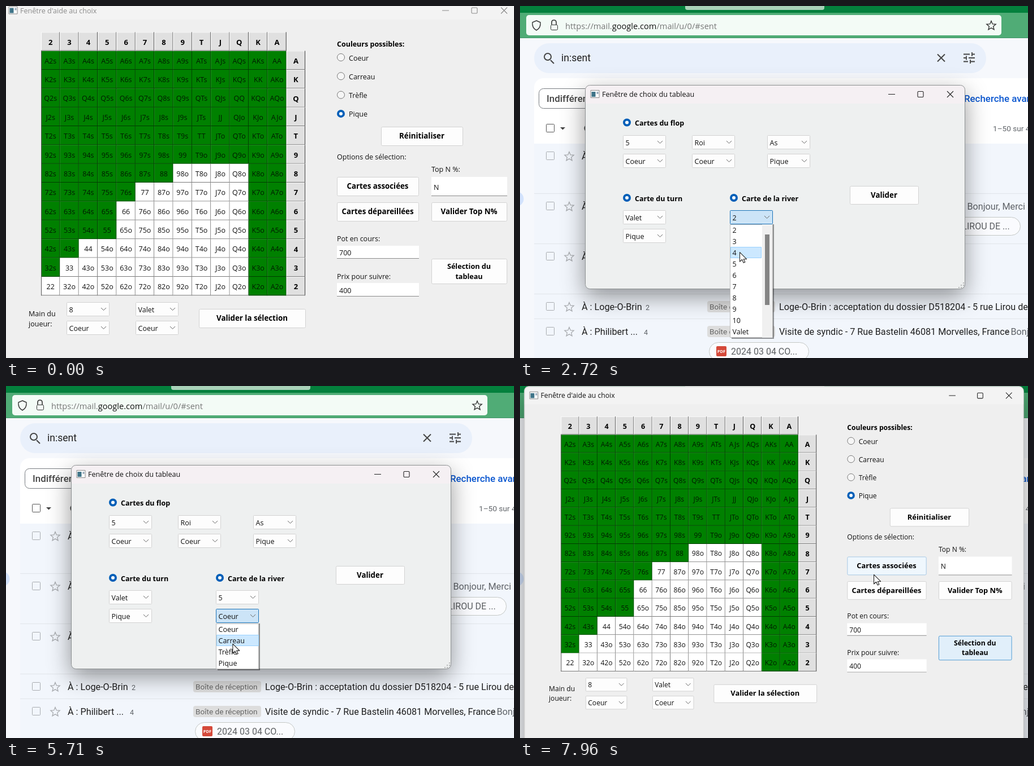
An HTML page with a canvas for the animation above (8000 ms loop, 898 by 624 pixels).

```html
<!DOCTYPE html>
<html lang="fr">
<meta charset="utf-8">
<title>Aide au choix</title>
<style>
html, body { margin: 0; width: 100%; height: 100%; overflow: hidden; }
canvas { display: block; }
</style>
<canvas id="stage" width="898" height="624"></canvas>
<script>
const LOOP = 8000, W = 898, H = 624;
const screen2d = document.getElementById('stage').getContext('2d');
const layer2d = Object.assign(document.createElement('canvas'), { width: W, height: H }).getContext('2d');
let g = screen2d;

const UI = '"Open Sans", "Noto Sans", sans-serif', WEB = 'Roboto, Arial, sans-serif';
const RANKS = '23456789TJQKA';
const clamp = v => Math.max(0, Math.min(1, v));
const span = (t, from, length) => clamp((t - from) / length);
const between = (t, a, b) => t >= a && t < b;

// Drawing helpers; text is centred vertically on y by cap height
function box(x, y, w, h, fill, line, r = 0) {
  g.beginPath();
  const o = line ? .5 : 0;
  g.roundRect(x + o, y + o, w, h, r);
  if (fill) { g.fillStyle = fill; g.fill(); }
  if (line) { g.strokeStyle = line; g.lineWidth = 1; g.stroke(); }
}
function text(s, x, y, { size = 12.5, weight = 400, color = '#111', align = 'left', family = UI } = {}) {
  g.font = `${weight} ${size}px ${family}`;
  g.fillStyle = color;
  g.textAlign = align;
  g.fillText(s, x, y + size * .36);
}
const web = (s, x, y, o) => text(s, x, y, { size: 16.2, family: WEB, color: '#1f1f1f', ...o });
const bold = (s, x, y, o) => text(s, x, y, { weight: 700, color: '#000', ...o });
function path(d, line, width = 1, fill) {
  const p = new Path2D(d);
  if (fill) { g.fillStyle = fill; g.fill(p); }
  if (line) { g.strokeStyle = line; g.lineWidth = width; g.stroke(p); }
}
function circle(x, y, r, fill, line) {
  g.beginPath();
  g.arc(x, y, r, 0, 7);
  g.fillStyle = fill;
  g.fill();
  if (line) { g.strokeStyle = line; g.lineWidth = 1; g.stroke(); }
}
function star(x, y, r, color, width) {
  let d = '';
  for (let i = 0; i < 10; i++) {
    const a = i * Math.PI / 5, q = i % 2 ? r * .45 : r;
    d += (i ? 'L' : 'M') + (x + q * Math.sin(a)) + ' ' + (y - q * Math.cos(a));
  }
  path(d + 'Z', color, width);
}

// Widgets; level: 0 idle, 1 soft, 2 hover, 3 pressed
const FILLS = ['#fdfdfd', '#eff7fd', '#e1effa', '#cce4f7'];
const LINES = ['#d2d2d2', '#a5c8e4', '#4c9ad4', '#1a73b8'];
function button(label, x, y, w, h, level = 0) {
  box(x, y, w, h, FILLS[level], LINES[level], 2);
  const lines = label.split('\n');
  lines.forEach((s, i) => bold(s, x + w / 2, y + h / 2 + (i - (lines.length - 1) / 2) * 18,
    { size: lines.length > 1 ? 12.6 : 13.3, align: 'center' }));
}
function combo(label, x, y, level = 0) {
  box(x, y, 75, 24, FILLS[level], LINES[level], 1);
  text(label, x + 4.5, y + 13);
  path(`M${x + 61} ${y + 10}l4.5 4.5l4.5 -4.5`, '#666');
}
function entry(label, x, y, w, h) {
  box(x, y, w, h, '#fff');
  box(x, y + h - 1, w, 1, '#8a8a8a');
  text(label, x + 4, y + h / 2 + 1);
}
function radio(label, x, y, on, strong) {
  if (on) { circle(x, y, 7, '#005fb8'); circle(x, y, 3, '#fff'); }
  else circle(x, y, 6.5, '#f6f6f6', '#777');
  (strong ? bold : text)(label, x + 14, y + 1);
}
function titleBar(label, x, y, right, color, iconColor) {
  box(x, y - 7, 15, 13, '#fff', '#888');
  box(x + 2, y - 4, 7, 9, '#3f7488');
  box(x + 11, y - 4, 3, 4, '#9ab');
  text(label, x + 20.5, y + .5, { size: 12.6, color });
  path(`M${right - 109} ${y + .5}h12M${right - 5} ${y - 5}l11 11m0 -11l-11 11`, iconColor, 1.1);
  g.beginPath();
  g.roundRect(right - 57, y - 4.5, 10, 10, 1.5);
  g.stroke();
}
function windowFrame(x, y, w, h, title, fill, line) {
  g.save();
  g.shadowColor = 'rgba(0,0,0,.42)';
  g.shadowBlur = 42;
  g.shadowOffsetY = 14;
  box(x, y, w, h, fill, null, 8);
  g.restore();
  g.save();
  g.beginPath();
  g.roundRect(x, y, w, h, 8);
  g.clip();
  box(x, y, w, 33, title);
  g.restore();
  box(x, y, w, h, null, line, 8);
}

function chip(label, x, y, w = 176) {
  box(x, y - 16, w, 32, '#fafbfe', '#c4c7c5', 16);
  box(x + 13, y - 9, 18, 18, '#d5493a', null, 2);
  text('PDF', x + 22, y, { size: 7.5, weight: 700, color: '#fff', align: 'center' });
  web(label, x + 39, y, { color: '#5c5f62', size: 16 });
}
function mailRow(y, to, count, subject, tagged, snippet, snippetX) {
  box(46, y - 8, 14, 14, null, '#a9acb0', 1);
  star(87, y + 1, 8.5, '#a9acb0', 1.3);
  web('À : ' + to, 109, y);
  web(count, count && to.length > 11 ? 219 : 222, y + 1, { size: 12.5, color: '#5f6368' });
  if (tagged) {
    box(331, y - 10, 120, 20, '#dddddd', null, 4);
    web('Boîte de réception', 335, y, { size: 13.6, color: '#666' });
  }
  web(subject, tagged ? 458 : 331, y);
  if (snippet) web(snippet, snippetX, y, { color: '#5f6368' });
}

function mailPage() {
  box(0, 0, W, H, '#f6f8fc');
  box(0, 0, W, 12, '#04803d');
  box(0, 12, W, 45, '#50ac76');
  box(0, 56, W, 1, '#3f9465');
  box(292, -6, 246, 13, '#a8d1b8', null, 4);
  box(11, 16, 840, 36, '#f3fbf6', null, 5);
  path('M29 26l7 3q1 10 -7 14q-8 -4 -7 -14z', '#333', 1.4);
  path('M56 33v-4q0 -4 4 -4t4 4v4', '#333', 1.6);
  box(54, 33, 12, 9, null, '#333', 2);
  star(833, 35, 8.5, '#333', 1.4);
  let x = 80;
  [['https://mail.', '#777'], ['google.com', '#111'], ['/mail/u/0/#sent', '#777']].forEach(([s, color]) => {
    text(s, x, 35.5, { size: 14.6, color });
    x += g.measureText(s).width;
  });

  box(25, 66, 799, 53, '#e9f0fb', null, 27);
  path('M54 96l6 6M55 90a6 6 0 1 0 -12 0a6 6 0 1 0 12 0', '#444', 2);
  web('in:sent', 73, 92, { size: 17.5 });
  path('M738 85.500l13 13m0 -13l-13 13', '#444', 2);
  path('M784 85.500h11M799 85.500h5M799 82v7M784 92h5M793 92h11M789 88.500v7M784 98.500h8M796 98.500h8M796 95v7', '#444', 1.8);

  box(25, 128, 900, 520, '#fff', null, 16);
  [[33, 143, 'Indifférente', 47], [187, 216, 'Contient une pièce jointe', 200],
   [413, 279, "Exclure les mises à jour d'agenda", 427], [701, 65, 'À', 715]].forEach(([l, w, s, tx]) => {
    box(l, 146, w, 35, '#fff', '#777b80', 8);
    web(s, tx, 163.5, { size: 16.9, weight: 500, color: '#444' });
  });
  path('M149 161h10l-5 5zM738 161h10l-5 5z', null, 0, '#444');
  web('Recherche avancée', 785, 163.5, { size: 16.9, weight: 500, color: '#0b57d0' });
  box(46, 209, 14, 14, null, '#555', 1);
  path('M71 215h9l-4.500 4.500z', null, 0, '#444');
  path('M125 213a6 6 0 1 0 1 5M126 210v5h-5', '#444', 1.7);
  [211, 217, 223].forEach(y => circle(165, y, 1.7, '#444'));
  web('1–50 sur 4 218', 836, 217, { size: 13.6, color: '#5f6368' });

  box(25, 244, 900, 400, '#f2f6fc');
  [332, 421, 510, 554].forEach(y => box(25, y, 900, 1, '#e1e5ea'));
  circle(-7, 342, 13.5, '#d3e3fd');
  mailRow(266, 'Elodie', '', 'Bail rue Lirou de Sane');
  mailRow(355, 'Loge-O-Brin', '4', 'Loge-O-Brin : appartement pré-bloqué 16039', true, '- Bonjour, Merci infiniment', 782);
  mailRow(444, 'LORM', '', 'Doc Tramelo');
  mailRow(533, 'Loge-O-Brin', '2', 'Loge-O-Brin : acceptation du dossier D518204 - 5 rue Lirou de Sane', true);
  mailRow(577, 'Philibert ...', '4', 'Visite de syndic - 7 Rue Bastelin 46081 Morvelles, France', true, '- Bonjour', 859);
  chip('C29192 - BAIL L...', 334, 301);
  chip('BAIL LIROU DE...', 334, 390);
  chip('RIB LOB GERAN...', 521, 390);
  chip('DDT LIROU DE ...', 708, 390);
  chip('attestation-2.pdf', 334, 479, 171);
  chip('CNI_Dos(1).pdf', 516, 479, 158);
  chip('2024 03 04 CO...', 334, 612);
}

function handGrid() {
  const x0 = 62, y0 = 46.2, d = 33.36;
  const head = (s, x, y) => {
    box(x, y, d, d, '#e0e0e0');
    box(x, y, 1, d, '#fff');
    box(x, y, d, 1, '#f8f8f8');
    box(x + d - 1, y, 1, d, '#444');
    box(x, y + d - 1, d, 1, '#777');
    bold(s, x + d / 2, y + d / 2 + 1, { align: 'center', size: 13 });
  };
  for (let row = 0; row < 13; row++) {
    const hi = 12 - row, y = y0 + d * (row + 1);
    for (let col = 0; col < 13; col++) {
      const x = x0 + col * d;
      const name = RANKS[Math.max(hi, col)] + RANKS[Math.min(hi, col)] + (hi > col ? 's' : hi < col ? 'o' : '');
      const green = hi > 6 || col > 10 || hi > col || name === '88' || name === '55';
      box(x, y, d, d, green ? '#008000' : '#fff');
      box(x + d - 1, y, 1, d, green ? '#003c00' : '#777');
      box(x, y + d - 1, d, 1, green ? '#003c00' : '#777');
      text(name, x + d / 2, y + d / 2 + 1, { align: 'center', color: green ? '#001a00' : '#111' });
    }
    head(RANKS[hi], x0 + 13 * d, y);
  }
  for (let col = 0; col < 13; col++) head(RANKS[col], x0 + col * d, y0);
  box(x0, y0 + d, 1, 13 * d, '#555');
}

function mainWindow(t) {
  const back = t > 7000;
  windowFrame(-5, -9, 912, 690, '#f3f3f3', '#efefef', '#c4c4c4');
  titleBar("Fenêtre d'aide au choix", 4.5, 7.5, 880, t < 820 ? '#8a8a8a' : '#111', t < 60 ? '#8a8a8a' : '#222');
  handGrid();
  bold('Couleurs possibles:', 585, 67);
  ['Coeur', 'Carreau', 'Trèfle', 'Pique'].forEach((s, i) => radio(s, 592, 91 + i * 33.3, i === 3));
  button('Réinitialiser', 663, 214, 144, 33);
  text('Options de sélection:', 585, 267.5);
  text('Top N %:', 752, 289.5);
  entry('N', 752, 303, 134, 34);
  button('Cartes associées', 585, 303, 144, 33, back && t > 7930 ? 1 : 0);
  button('Cartes dépareillées', 585, 348, 144, 33);
  button('Valider Top N%', 752, 348, 133, 33);
  text('Pot en cours:', 585, 412);
  entry('700', 585, 425, 145, 23);
  text('Prix pour suivre:', 585, 479);
  entry('400', 585, 491, 145, 24);
  button('Sélection du\ntableau', 752, 448, 133, 44, back || t > 410 ? 2 : 0);
  text('Main du', 40, 545);
  text('joueur:', 40, 563);
  combo('8', 107, 525);
  combo('Coeur', 107, 558);
  combo('Valet', 229, 525);
  combo('Coeur', 229, 558);
  button('Valider la sélection', 341, 537, 188, 33);
}

function dropList(items, y, rows, open, cursorY, scrolls) {
  const h = rows * 20 + 1, shown = h * open, width = scrolls ? 55 : 75;
  const hot = Math.max(0, Math.min(rows - 1, Math.floor((cursorY - y) / 20)));
  box(374, y, 75, shown + 2, 'rgba(0,0,0,.4)');
  g.save();
  g.beginPath();
  g.rect(371, y, 76, shown + 1);
  g.clip();
  g.translate(0, shown - h);
  box(371, y, 75, h - 1, '#fff', '#bbb');
  box(372, y + hot * 20, width - 1, 19, '#cce8ff', '#99d1ff');
  items.forEach((s, i) => text(s, 375.5, y + 10.500 + i * 20));
  if (scrolls) {
    box(428, y, 18, h, '#f0f0f0');
    box(433, y + 18, 8, 125, '#858585');
  }
  g.restore();
}

function boardWindow(t, cursorY) {
  windowFrame(115, 140, 671, 361, '#f5f0f3', '#eef0f0', '#8d9192');
  titleBar('Fenêtre de choix du tableau', 124.500, 156, 760, '#111', '#222');
  radio('Cartes du flop', 189, 206.500, true, true);
  [['5', 'Coeur', 182], ['Roi', 'Coeur', 304], ['As', 'Pique', 437]].forEach(([rank, suit, x]) => {
    combo(rank, x, 229);
    combo(suit, x, 262);
  });
  radio('Carte du turn', 189, 340, true, true);
  combo('Valet', 182, 362);
  combo('Pique', 182, 395);
  radio('Carte de la river', 378, 340, t >= 1800, true);
  const rankLevel = between(t, 2400, 5050) ? 3 : between(t, 2200, 2400) ? 2 : between(t, 1500, 1700) ? 1 : 0;
  const suitLevel = between(t, 5500, 6200) ? 3 : between(t, 1440, 1680) || between(t, 5250, 5500) ? 2 : 0;
  combo(t < 4770 ? '2' : '5', 371, 362, rankLevel);
  combo(t < 6100 ? 'Coeur' : 'Pique', 371, 395, suitLevel);
  button('Valider', 583, 319, 121, 32, t < 7060 ? 0 : t < 7150 ? 1 : t < 7700 ? 2 : 3);
  for (let i = 0; i < 3; i++) for (let j = 0; j <= i; j++) box(783 - j * 4, 490 + i * 4, 2, 2, '#b4b6b6');
  if (between(t, 2380, 4770))
    dropList(['2', '3', '4', '5', '6', '7', '8', '9', '10', 'Valet'], 387, 10, span(t, 2380, 70), cursorY, true);
  if (between(t, 5500, 6100))
    dropList(['Coeur', 'Carreau', 'Trèfle', 'Pique'], 421, 4, span(t, 5500, 70), cursorY, false);
}

// Pointer track: time, x, y
const TRACK = [
  [0, 814, 632], [30, 814, 620], [490, 807, 457], [960, 807, 457], [1380, 440, 450], [1480, 408, 405],
  [1580, 381, 352], [1700, 379, 337], [1900, 379, 337], [2300, 405, 374], [2440, 405, 376], [2720, 388, 436],
  [3300, 394, 548], [3440, 394, 548], [3660, 394, 417], [3820, 394, 417], [4050, 400, 471], [4280, 400, 471],
  [4460, 403, 458], [4770, 403, 458], [4870, 407, 452], [5000, 407, 452], [5400, 405, 408], [5590, 404, 410],
  [5790, 398, 487], [6100, 398, 487], [6820, 580, 382], [6900, 590, 369], [7280, 612, 340], [7740, 612, 340],
  [7960, 625, 334], [8000, 627, 333]
];
function pointer(t) {
  const i = Math.max(1, TRACK.findIndex(k => k[0] > t));
  const [ta, xa, ya] = TRACK[i - 1], [tb, xb, yb] = TRACK[i];
  const p = (t - ta) / (tb - ta);
  return [xa + (xb - xa) * p, ya + (yb - ya) * p];
}
function drawPointer(x, y, hand) {
  g.save();
  g.translate(x, y);
  g.lineJoin = 'round';
  path(hand ? 'M-2 1q2 -4 4 0v8l7 1.500q2 1 2 3l-2 8h-9l-6 -8q0 -4 4 -1z'
            : 'M.5 .5v16.500l4 -3.700l2.700 5.700l2.600 -1.200l-2.600 -5.300h5.300z', '#222', 1.1, '#fff');
  g.restore();
}

// Paint a window separately, then blend it, scaled about (cx, cy)
function layer(draw, alpha, scale, cx, cy) {
  if (alpha <= 0) return;
  g = layer2d;
  g.setTransform(1, 0, 0, 1, 0, 0);
  g.clearRect(0, 0, W, H);
  g.setTransform(scale, 0, 0, scale, cx * (1 - scale), cy * (1 - scale));
  draw();
  g = screen2d;
  g.globalAlpha = alpha;
  g.drawImage(layer2d.canvas, 0, 0);
  g.globalAlpha = 1;
}

function frame(now) {
  const t = now % LOOP, [x, y] = pointer(t);
  mailPage();
  if (t < 1150) {
    const p = span(t, 850, 250);
    layer(() => mainWindow(t), 1 - p, 1 - .045 * p, 380, 287);
  } else if (t < 7860) {
    const p = span(t, 1150, 250), q = span(t, 7740, 110);
    layer(() => boardWindow(t, y), Math.min(1, p * 2) * (1 - q), 1 - .1 * (1 - p) ** 3 - .06 * q, 451, 320);
  }
  if (t > 7850) {
    const p = span(t, 7850, 250);
    layer(() => mainWindow(t), Math.min(1, p * 3), 1 - .105 * (1 - p) ** 2, 380, 287);
  }
  drawPointer(x, y, between(t, 410, 1000));
  requestAnimationFrame(frame);
}
requestAnimationFrame(frame);
</script>
</html>
```
